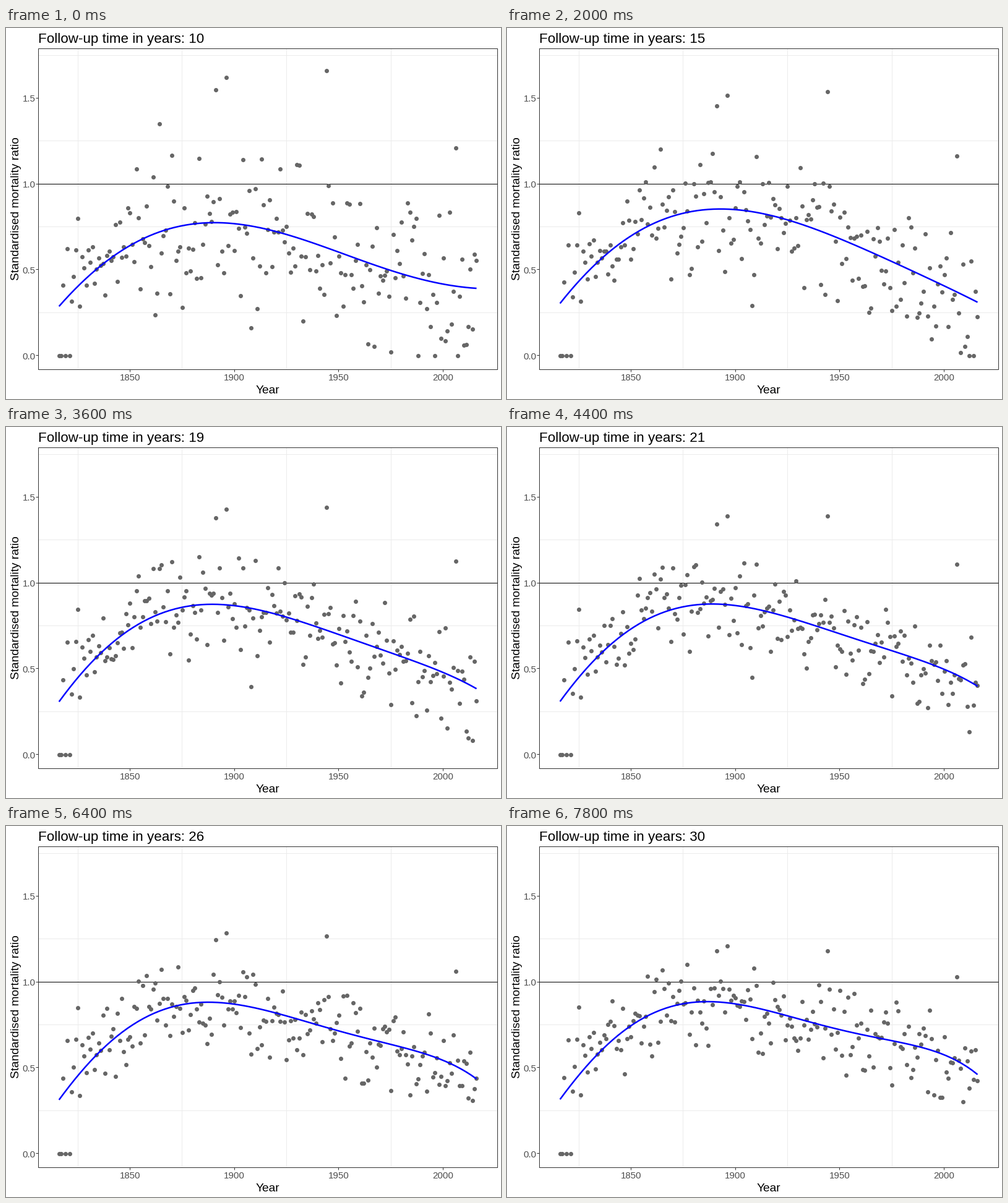
A matplotlib script that plays this animation: 800x600 px, repeating every 8000 ms.

```python
import matplotlib.pyplot as plt
import numpy as np
from matplotlib.animation import FuncAnimation
from matplotlib.patches import Rectangle

W, H, DPI = 800, 600, 100
FRAMES, STEP_MS = 40, 200
PT = 72 / DPI                       # points per pixel
LEFT, RIGHT, TOP, BOTTOM = 52.5, 794.5, 33.5, 552.5

plt.rcParams["font.family"] = "Liberation Sans"


def px(year):
    return 200.4 + (np.asarray(year) - 1850) * 3.374


def py(ratio):
    return 529.5 - np.asarray(ratio) * 277.4


# The trend is a quintic through six years, whose heights move over time.
KNOTS = np.array([1816, 1845, 1880, 1925, 1975, 2016])
TREND = {
    0: [.286, .603, .766, .705, .495, .391],
    4: [.300, .583, .752, .700, .472, .345],
    10: [.303, .655, .841, .790, .547, .310],
    18: [.307, .685, .868, .800, .592, .383],
    39: [.315, .700, .881, .802, .657, .460],
}

# Years that stand out: first and last ratio.
NOTABLE = {1864: (1.35, .77), 1891: (1.55, 1.18), 1896: (1.62, 1.21),
           1908: (.16, .67), 1944: (1.66, 1.18), 2006: (1.21, 1.03)}
NO_DEATHS = [1816, 1817, 1819, 1821]
SETTLED = 21                        # leading years that no longer change


def tween(keys, rows):
    """Linear motion of every column of rows over all frames."""
    frames = np.arange(FRAMES)
    return np.column_stack([np.interp(frames, keys, col)
                            for col in np.transpose(rows)])


def trend(years):
    curves = [np.polyval(np.polyfit((KNOTS - 1916) / 100, row, 5),
                         (years - 1916) / 100) for row in TREND.values()]
    return tween(list(TREND), curves)


def scatter(years):
    """Ratios per frame: trend plus a slowly drifting, shrinking residual."""
    rng = np.random.default_rng(18)
    drift = [rng.normal(size=years.size)]
    for _ in range(20):
        drift.append(.9 * drift[-1] + .436 * rng.normal(size=years.size))
    follow = np.arange(21)
    spread = .125 + .125 * np.exp(-follow / 8)
    residual = np.clip(drift, -1.9, 1.7) * spread[:, None]
    residual[:, :SETTLED] = .14 * drift[0][:SETTLED]
    keys = np.round(follow * (FRAMES - 1) / 20)
    ratios = np.maximum(trend(years) + tween(keys, residual), 0)

    ease = np.linspace(0, 1, FRAMES)
    for year, (first, last) in NOTABLE.items():
        ratios[:, year - 1816] = first + (last - first) * ease
    ratios[:, np.array(NO_DEATHS) - 1816] = 0
    return ratios


years = np.arange(1816, 2017)
line_x = np.linspace(1816, 2016, 80)
points, curves = scatter(years), trend(line_x)

fig = plt.figure(figsize=(W / DPI, H / DPI), dpi=DPI, facecolor="white")
ax = fig.add_axes([0, 0, 1, 1])
ax.set_xlim(0, W)
ax.set_ylim(H, 0)
ax.axis("off")


def rule(xs, ys, color, z):
    ax.plot(xs, ys, color=color, lw=PT, zorder=z,
            solid_capstyle="butt", snap=False)


def vline(year, y0, y1, color, z):
    x = np.floor(px(year)) + .5
    rule([x, x], [y0, y1], color, z)


def hline(ratio, x0, x1, color, z):
    y = np.floor(py(ratio)) + .5
    rule([x0, x1], [y, y], color, z)


def label(x, y, text, size, color="black", ha="center", **kw):
    return ax.text(x, y, text, fontsize=size * PT, color=color, ha=ha,
                   va="baseline", **kw)


for year in (1825, 1875, 1925, 1975):
    vline(year, TOP, BOTTOM, "#EBEBEB", 1)
for ratio in (.25, .75, 1.25, 1.75):
    hline(ratio, LEFT, RIGHT, "#EBEBEB", 1)
hline(1, LEFT, RIGHT, "black", 2)

for year in (1850, 1900, 1950, 2000):
    vline(year, BOTTOM, BOTTOM + 4, "#333333", 5)
    label(px(year), 570, str(year), 15, "#4D4D4D")
for ratio in (0, .5, 1, 1.5):
    hline(ratio, LEFT - 4, LEFT, "#333333", 5)
    label(47.5, py(ratio) + 6, f"{ratio:.1f}", 15, "#4D4D4D", ha="right")

panel = Rectangle((LEFT, TOP), RIGHT - LEFT, BOTTOM - TOP, fill=False,
                  ec="#333333", lw=PT, zorder=6, snap=False)
ax.add_patch(panel)

label(423, 591, "Year", 19.2)
label(21, 292.5, "Standardised mortality ratio", 19.2,
      rotation=90, rotation_mode="anchor")
title = label(52, 24, "", 22.4, ha="left")

dots, = ax.plot([], [], "o", ms=7 * PT, color="#666666", mew=0, zorder=3)
curve, = ax.plot([], [], color="#0000FF", lw=2.5 * PT, zorder=4,
                 solid_capstyle="butt")


def draw(i):
    follow_up = 10 + 20 * i / (FRAMES - 1)
    title.set_text(f"Follow-up time in years: {round(follow_up)}")
    dots.set_data(px(years), py(points[i]))
    curve.set_data(px(line_x), py(curves[i]))
    return title, dots, curve


anim = FuncAnimation(fig, draw, frames=FRAMES, interval=STEP_MS,
                     init_func=lambda: draw(0), repeat=True, repeat_delay=0)
plt.show()
```
